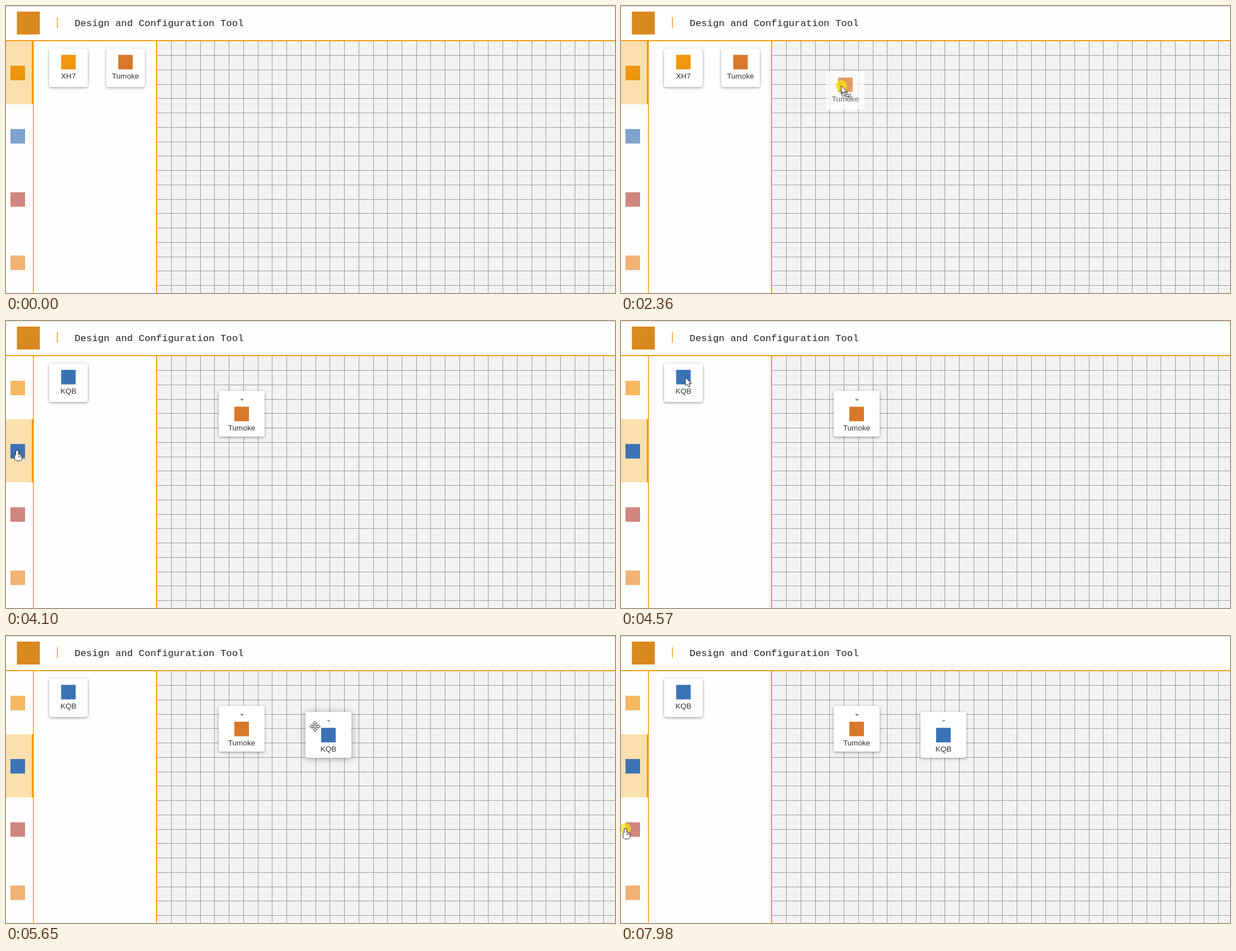
Animation, 1088 px wide and 514 px high, one loop 8000 ms. Source, as an HTML page with a canvas:

```html
<!DOCTYPE html>
<html lang="en">
<head>
<meta charset="utf-8">
<title>Design and Configuration Tool</title>
<style>
html, body { margin: 0; width: 100%; height: 100%; overflow: hidden; background: #fff; }
canvas { display: block; }
</style>
</head>
<body>
<canvas id="stage" width="1088" height="514"></canvas>
<script>
const ctx = document.getElementById('stage').getContext('2d');
const LOOP = 8000, CELL = 25.73, TAB = 113.3, NODE = 82;
const ORANGE = '#f39c12', BLUE = '#3a72b5';
const TABS = ['#f0960f', BLUE, '#b9483d', '#ec8a2b'];
const XH7 = { label: 'XH7', color: TABS[0] };
const TUMOKE = { label: 'Tumoke', color: '#d8782a', caret: '#777' };
const KQB = { label: 'KQB', color: BLUE, caret: '#7f9fc4' };

const linear = u => u;
const easeOut = u => u * (2 - u);

// Pointer moves in discrete steps; a move with an item drags it until the drop.
const START = { x: 878, y: 500 };
const MOVES = [
  { from: 280, to: 540, steps: 5, x: 335, y: 191 },
  { from: 850, to: 1220, steps: 6, x: 210, y: 112 },
  { from: 1740, to: 2490, steps: 11, x: 401, y: 144,
    item: TUMOKE, grab: { x: 27, y: 26 }, drop: 2560, node: { x: 380, y: 125 } },
  { from: 3230, to: 4030, steps: 12, x: 20, y: 232 },
  { from: 4100, to: 4570, steps: 8, x: 115, y: 101 },
  { from: 4840, to: 5590, steps: 11, x: 552, y: 162, ease: linear, bow: 17,
    item: KQB, grab: { x: 70, y: 28 }, drop: 5650, node: { x: 535, y: 136 } },
  { from: 5650, to: 5990, steps: 5, x: 526, y: 164 },
  { from: 7110, to: 7910, steps: 13, x: 8, y: 345 }
];
const DRAGS = MOVES.filter(m => m.item);
const isClick = t => t >= 4030 && t < 4100 || t >= 7980;

const ARROW = new Path2D('M0 0V15L3.5 12 6 17 8.5 16 6.2 11H11Z');
const MOVE_ARM = new Path2D('M1.2-1.2V-5H3.5L0-9.5-3.5-5H-1.2V-1.2');

const step = (m, t) => Math.min(m.steps - 1, Math.floor((t - m.from) / (m.to - m.from) * (m.steps - 1)));

function pointerAt(t) {
  const i = MOVES.findLastIndex(m => t >= m.from);
  if (i < 0) return START;
  const m = MOVES[i], a = MOVES[i - 1] || START;
  const u = (m.ease || easeOut)(step(m, t) / (m.steps - 1));
  const bow = 4 * u * (1 - u) * (m.bow || 0);
  return { x: a.x + (m.x - a.x) * u, y: a.y + (m.y - a.y) * u + bow };
}

function rect(color, x, y, w, h) {
  ctx.fillStyle = color;
  ctx.fillRect(x, y, w, h);
}

function square(color, x, y, size) {
  rect(color, x - size / 2, y - size / 2, size, size);
}

function text(str, x, y, font, align = 'center', color = '#333') {
  ctx.font = font;
  ctx.textAlign = align;
  ctx.fillStyle = color;
  ctx.fillText(str, x, y);
}

function outlined(path, stroke = '#222') {
  ctx.fillStyle = '#fff';
  ctx.strokeStyle = stroke;
  ctx.lineWidth = 1;
  ctx.fill(path);
  ctx.stroke(path);
}

function card(item, x, y, { size = 69, drop = 0, blur = 5 } = {}) {
  ctx.save();
  ctx.shadowColor = 'rgba(0,0,0,.38)';
  ctx.shadowBlur = blur;
  ctx.shadowOffsetY = blur && 1.5;
  ctx.beginPath();
  ctx.roundRect(x, y, size, size, 3);
  ctx.fillStyle = '#fff';
  ctx.fill();
  ctx.restore();
  const mid = x + size / 2;
  square(item.color, mid, y + 24.5 + drop, 26);
  text(item.label, mid, y + 54 + drop, '13.6px "Liberation Sans", Arial, sans-serif');
}

function isOver(p, { x, y }, pad = 0) {
  return Math.abs(p.x - x - NODE / 2) < NODE / 2 + pad && Math.abs(p.y - y - NODE / 2) < NODE / 2 + pad;
}

function drawHeader() {
  rect('#fefefe', 0, 0, 1088, 514);
  rect('#d9d9d9', 0, 0, 1088, 1);
  square('#d98a1e', 40, 30.5, 41);
  rect(ORANGE, 91, 20, 1.5, 19);
  text('Design and Configuration Tool', 122.5, 35.5,
    '17.38px "Liberation Mono", "Courier New", monospace', 'left', '#222');
}

function drawGrid() {
  rect('#f2f2f2', 270, 63, 818, 451);
  for (let x = 295.3; x < 1088; x += CELL) rect('#999', Math.round(x), 63, 1, 451);
  for (let y = 88.3; y < 514; y += CELL) rect('#999', 270, Math.round(y), 818, 1);
  rect(ORANGE, 0, 61, 1088, 2);
  rect(ORANGE, 268, 62, 2, 452);
}

function drawSidebar(active) {
  rect('#f6b043', 48, 63, 2, 451);
  const top = Math.floor(63 + active * TAB);
  rect('#fbdfae', 0, top, 47, 113);
  rect(ORANGE, 46, top, 3, 113);
  TABS.forEach((color, i) => {
    ctx.globalAlpha = i === active ? 1 : 0.65;
    square(color, 21, 120 + i * TAB, 26);
  });
  ctx.globalAlpha = 1;
  const items = active ? [KQB] : [XH7, TUMOKE];
  items.forEach((item, i) => card(item, 77 + i * 102, 76));
}

function drawNode({ item, node }, hovered) {
  card(item, node.x, node.y, { size: NODE, drop: 17, blur: hovered ? 12 : 5 });
  ctx.fillStyle = item.caret;
  ctx.beginPath();
  ctx.moveTo(node.x + 38, node.y + 14.5);
  ctx.lineTo(node.x + 45, node.y + 14.5);
  ctx.lineTo(node.x + 41.5, node.y + 18);
  ctx.fill();
}

function drawHand() {
  const hand = new Path2D();
  hand.roundRect(-2, 0, 4, 13, 2);
  hand.roundRect(-4, 7, 12, 11, 4);
  ctx.strokeStyle = '#222';
  ctx.lineWidth = 2;
  ctx.stroke(hand);
  ctx.fillStyle = '#fff';
  ctx.fill(hand);
  for (let x = 2; x < 7; x += 2) rect('#222', x, 8, 0.7, 4);
}

function drawMove() {
  for (let i = 0; i < 4; i++) {
    outlined(MOVE_ARM);
    ctx.rotate(Math.PI / 2);
  }
}

function drawForbidden() {
  ctx.strokeStyle = '#2a2a0a';
  ctx.lineWidth = 2;
  ctx.beginPath();
  ctx.arc(0, 0, 7.5, 0, 7);
  ctx.moveTo(-5.3, -5.3);
  ctx.lineTo(5.3, 5.3);
  ctx.stroke();
}

function drawBadge() {
  ctx.lineWidth = 1;
  ctx.strokeStyle = '#444';
  ctx.strokeRect(1.5, 11.5, 9, 7);
  rect('#fff', 8, 15, 9, 9);
  ctx.strokeRect(8.5, 15.5, 8, 8);
  rect('#111', 10, 19, 5, 1);
  rect('#111', 12, 17, 1, 5);
}

function drawPointer(t, p, held, dragging, nodes) {
  ctx.save();
  ctx.translate(p.x, p.y);
  if (held || isClick(t)) {
    ctx.beginPath();
    ctx.arc(0, 0, 10, 0, 7);
    ctx.fillStyle = 'rgba(250,228,10,.72)';
    ctx.fill();
  }
  if (dragging && p.x < 300) drawForbidden();
  else if (!dragging && p.x < 48) drawHand();
  else if (!dragging && nodes.some(n => isOver(p, n.node, 12))) drawMove();
  else {
    outlined(ARROW);
    if (dragging) drawBadge();
  }
  ctx.restore();
}

function draw(t) {
  const pointer = pointerAt(t);
  const held = DRAGS.find(d => t >= d.from && t < d.drop);
  const dragging = held && step(held, t) > 1;
  const nodes = DRAGS.filter(d => t >= d.drop);

  drawHeader();
  drawGrid();
  drawSidebar(t < 4100 ? 0 : 1);
  nodes.forEach(n => drawNode(n, isOver(pointer, n.node)));
  if (dragging) {
    ctx.globalAlpha = 0.72;
    card(held.item, pointer.x - held.grab.x, pointer.y - held.grab.y, { blur: 0 });
    ctx.globalAlpha = 1;
  }
  if (t >= MOVES[0].from) drawPointer(t, pointer, held, dragging, nodes);
}

const start = performance.now();
(function tick() {
  draw((performance.now() - start) % LOOP);
  requestAnimationFrame(tick);
})();
</script>
</body>
</html>
```
